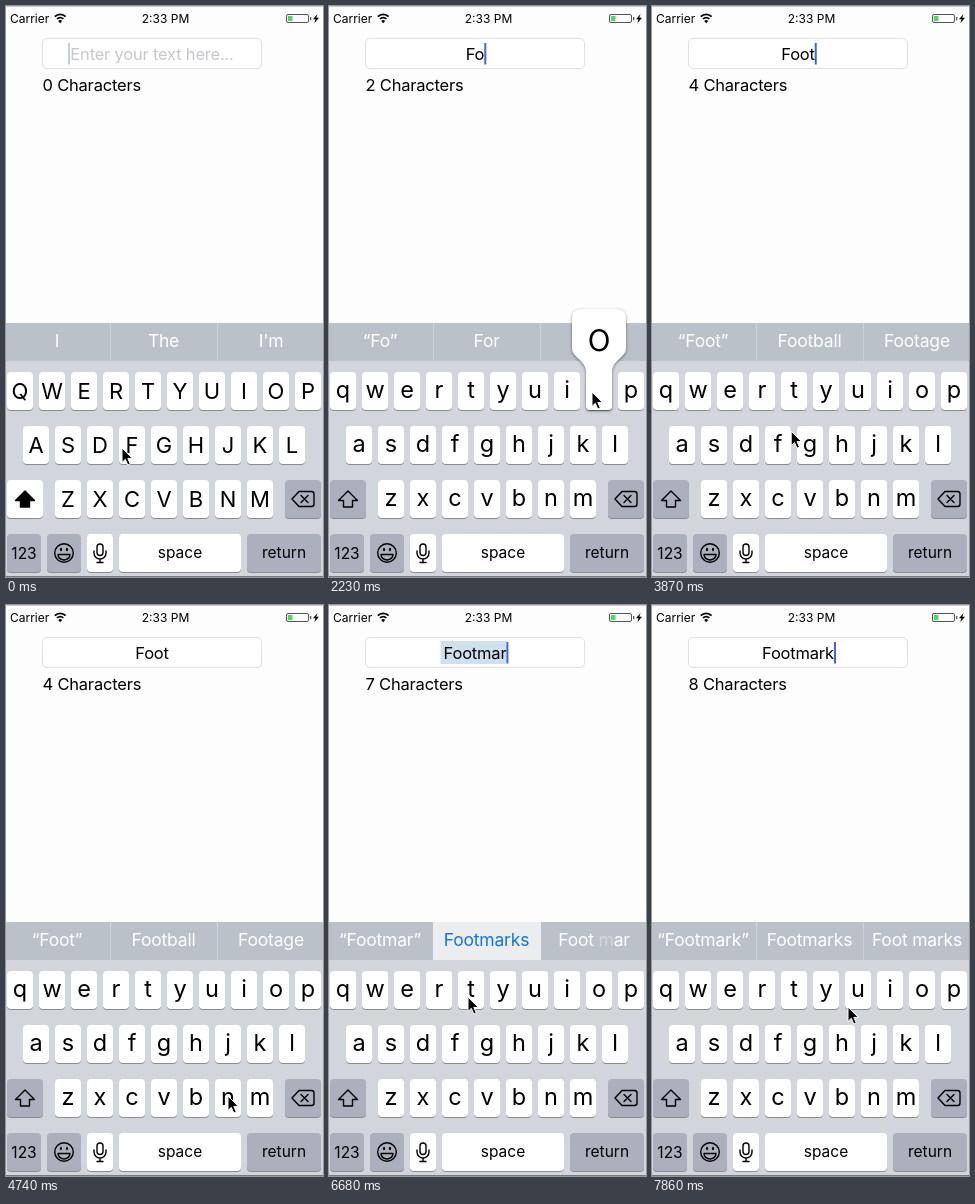
Recreate the animation shown at these times as an HTML page. Size 317x571 px, loop 8000 ms.

```html
<!DOCTYPE html>
<html lang="en">
<head>
<meta charset="utf-8">
<style>
html, body { margin: 0; width: 100%; height: 100%; overflow: hidden; background: #fdfdfd; }
svg { display: block; }
text { font: 16.5px Inter, "Open Sans", sans-serif; letter-spacing: -.2px; white-space: pre; }
.mid { text-anchor: middle; }
.status { font-size: 12px; letter-spacing: 0; }
.small { font-size: 15.5px; letter-spacing: 0; }
.hint { font-size: 17.5px; fill: #fff; }
.upper { font-size: 22px; letter-spacing: 0; }
.lower { font-size: 23.5px; letter-spacing: 0; }
.big { font-size: 40px; font-weight: 300; letter-spacing: 0; }
.line { fill: none; stroke: #000; stroke-width: 1.4; stroke-linejoin: round; stroke-linecap: round; }
#popup path { fill: #fff; filter: drop-shadow(0 1px 1.5px #0007); }
</style>
</head>
<body>
<svg width="317" height="571" viewBox="0 0 317 571">
  <rect width="317" height="571" fill="#fdfdfd"/>
  <rect width="317" height="1" fill="#c9c9c9"/>

  <text class="status" x="4" y="16.5">Carrier</text>
  <g class="line" style="stroke-width:1.7;stroke-linecap:butt">
    <path d="M48.8 10.6a7.5 7.5 0 0 1 10.8 0M51 13a4.5 4.5 0 0 1 6.4 0"/>
  </g>
  <path d="M54.2 17.2l-2-2.2a3 3 0 0 1 4 0z"/>
  <text class="status mid" x="159.5" y="16.5" font-weight="600">2:33 PM</text>
  <rect x="280.5" y="8.5" width="22" height="8" rx="1.5" fill="none" stroke="#555"/>
  <rect x="282" y="10" width="4.5" height="5" fill="#4cd964"/>
  <path d="M304 11h1.3v3.200H304z" fill="#555"/>
  <path d="M311.500 8l-4.500 5.200h2.500l-1.200 4 4.700-5.400h-2.700z"/>

  <rect x="36.500" y="32.500" width="219" height="30" rx="4.500" fill="#fff" stroke="#e1e1e1"/>
  <rect id="selection" y="36" height="23" fill="#cfe0ef"/>
  <text id="entry" class="mid" x="146" y="53.500"></text>
  <rect id="caret" y="37" width="2" height="21.500" fill="#3d66e6"/>
  <text id="count" x="36.500" y="84.500"></text>

  <rect y="317" width="317" height="254" fill="#d2d5db"/>
  <rect y="317" width="317" height="38" fill="#bac1c9"/>
  <path d="M104.500 317v38M211.500 317v38" stroke="#cdd2d8"/>
  <g id="hints"></g>
  <g id="keys"></g>
  <g id="popup"></g>
  <rect y="570" width="317" height="1" fill="#77797d"/>
  <path id="cursor" d="M0 0V14.500l3.300-3.200 2.500 5.700 2.500-1.100-2.500-5.500H10.300z" stroke="#fff"/>
</svg>

<script>
const LOOP = 8000, STEP = 148.3, LAST = 53;
const $ = id => document.getElementById(id);
const rows = [["QWERTYUIOP", 1, 366], ["ASDFGHJKL", 17, 420], ["ZXCVBNM", 49, 474]];

// [press step, letter]; the letter is entered one step after the press
const presses = [[7, "F"], [12, "o"], [15, "o"], [22, "t"], [34, "m"], [38, "a"], [43, "r"], [50, "k"]];

// {x} is half faded, * marks the highlighted suggestion
const hints = [
  [0, "I|The|I'm"],
  [9, "“F”|For|First"],
  [14, "“Fo”|For|Food"],
  [17, "“Foo”|Food|Football"],
  [24, "“Foot”|Football|Footage"],
  [36, "“Footm”|*Footmen|Footnote"],
  [39, "“Footm{a}”|*Foot{n}ote|Footnote{s}"],
  [40, "“Footma”|*Footnote|Footnotes"],
  [45, "“Footmar”|*Footmarks|Foot {m}ar"],
  [46, "“Footmar”|*Footmarks|Foot mark"],
  [52, "“Footmark”|Footmarks|Foot marks"]
];

// [step, x, y]
const path = [
  [0, 116, 442], [1, 116, 447], [8, 117, 446], [10, 247, 380], [12, 263, 386], [16, 263, 386],
  [18, 200, 384], [20, 122, 382], [22, 134, 386], [24, 136, 390], [29, 144, 478], [31, 222, 491],
  [32, 239, 490], [35, 239, 490], [38, 30, 438], [39, 30, 438], [43, 108, 388], [44, 110, 388],
  [45, 139, 392], [49, 246, 440], [51, 246, 440], [53, 196, 402]
];

const clamp = v => Math.max(0, Math.min(1, v));
const text = (s, x, y, cls) => `<text class="mid ${cls}" x="${x}" y="${y}">${s}</text>`;
const key = (x, y, w, fill = "#fff") =>
  `<rect x="${x}" y="${y + 1}" width="${w}" height="38" rx="4" fill="#898c91"/>` +
  `<rect x="${x}" y="${y}" width="${w}" height="38" rx="4" fill="${fill}"/>`;

function keyboard(upper) {
  const dark = "#abb0bc";
  let out = "";
  for (const [letters, left, y] of rows)
    [...letters].forEach((c, i) => {
      const x = left + 32 * i;
      out += key(x, y, 26) + (upper ? text(c, x + 13, y + 27, "upper")
                                    : text(c.toLowerCase(), x + 13, y + 25.5, "lower"));
    });
  return out +
    key(1, 474, 36, upper ? "#fff" : dark) +
    `<path class="line" ${upper ? 'style="fill:#000"' : ""} d="M19 485l-9.500 9.500h5v6.500h9v-6.500h5z"/>` +
    key(279, 474, 36, dark) +
    `<path class="line" d="M293 485.500h12.500q2.500 0 2.500 2.500v10q0 2.500-2.500 2.500H293l-7-7.500zM295 489.500l7 7m0-7l-7 7"/>` +
    key(1, 528, 34, dark) + text("123", 18, 553, "small") +
    key(41, 528, 34, dark) +
    `<circle class="line" cx="58" cy="547" r="9.300"/><path class="line" d="M52 548.500h12a6 5.500 0 0 1-12 0z"/>` +
    `<ellipse cx="55" cy="543.500" rx="1.100" ry="1.800"/><ellipse cx="61" cy="543.500" rx="1.100" ry="1.800"/>` +
    key(81, 528, 26) +
    `<rect class="line" x="91" y="538" width="6" height="11.500" rx="3"/>` +
    `<path class="line" d="M88 545v2a6 6 0 0 0 12 0v-2M94 553v3.500m-3 0h6"/>` +
    key(113, 528, 122) + text("space", 174, 552, "small") +
    key(241, 528, 74, dark) + text("return", 278, 552, "small");
}

function bubble(letter) {
  const [letters, left, y] = rows.find(r => r[0].includes(letter.toUpperCase()));
  const x = left + 32 * letters.indexOf(letter.toUpperCase());
  return `<path d="M${x - 5} ${y - 63}h36q9 0 9 9v30c0 10-14 12-14 24v34q0 4-4 4h-18q-4 0-4-4v-34` +
    `c0-12-14-14-14-24v-30q0-9 9-9z"/>` + text(letter, x + 13, y - 21, "big");
}

function suggestions(line) {
  return line.split("|").map((s, i) => {
    const on = s[0] == "*";
    const label = s.replace("*", "").replace(/{(.*?)}/g, '<tspan fill-opacity=".35">$1</tspan>');
    const cell = on ? '<rect x="104" y="317" width="108" height="38" fill="#ebedef"/>' : "";
    return cell + `<g ${on ? 'style="--c:#1673de"' : ""}>` +
      text(label, [51, 157.5, 265][i], 341, "hint").replace("<text", '<text style="fill:var(--c,#fff)"') + "</g>";
  }).join("");
}

function cursorAt(n) {
  const i = Math.max(1, path.findIndex(p => p[0] >= n));
  const [a, ax, ay] = path[i - 1], [b, bx, by] = path[i];
  const k = (n - a) / (b - a);
  return [ax + (bx - ax) * k, ay + (by - ay) * k];
}

// Solid for a second after typing, then fades out and in every second
function caretAlpha(ms) {
  if (ms < 1000) return 1;
  const p = ms % 1000;
  return p < 490 ? clamp(1 - p / 150) : clamp((p - 490) / 250);
}

let upperShown;
function draw(n) {
  const done = presses.filter(p => p[0] < n);
  const typed = done.map(p => p[1]).join("");
  const size = typed.length;
  const entry = $("entry");
  entry.textContent = typed || "Enter your text here...";
  entry.setAttribute("fill", size ? "#000" : "#c7c7cd");
  $("count").textContent = `${size} Character${size == 1 ? "" : "s"}`;

  const width = entry.getComputedTextLength();
  const end = 146 + width / 2;
  const since = size ? (n - done[size - 1][0] - 1) * STEP : 1100 + n * STEP;
  $("caret").setAttribute("x", size ? end : 62);
  $("caret").setAttribute("opacity", caretAlpha(since));

  const line = hints.filter(h => h[0] <= n).pop()[1];
  $("hints").innerHTML = suggestions(line);
  $("selection").setAttribute("x", 143 - width / 2);
  $("selection").setAttribute("width", line.includes("*") ? width + 3 : 0);

  if (upperShown !== !size) $("keys").innerHTML = keyboard(upperShown = !size);
  const down = presses.find(p => n == p[0] || n == p[0] + 1);
  $("popup").innerHTML = down ? bubble(down[1]) : "";
  $("cursor").setAttribute("transform", `translate(${cursorAt(n)})`);
}

let shown = -1;
function tick() {
  const n = Math.min(LAST, Math.floor((performance.now() % LOOP + 3) / STEP));
  if (n != shown) draw(shown = n);
  requestAnimationFrame(tick);
}
tick();
</script>
</body>
</html>
```
